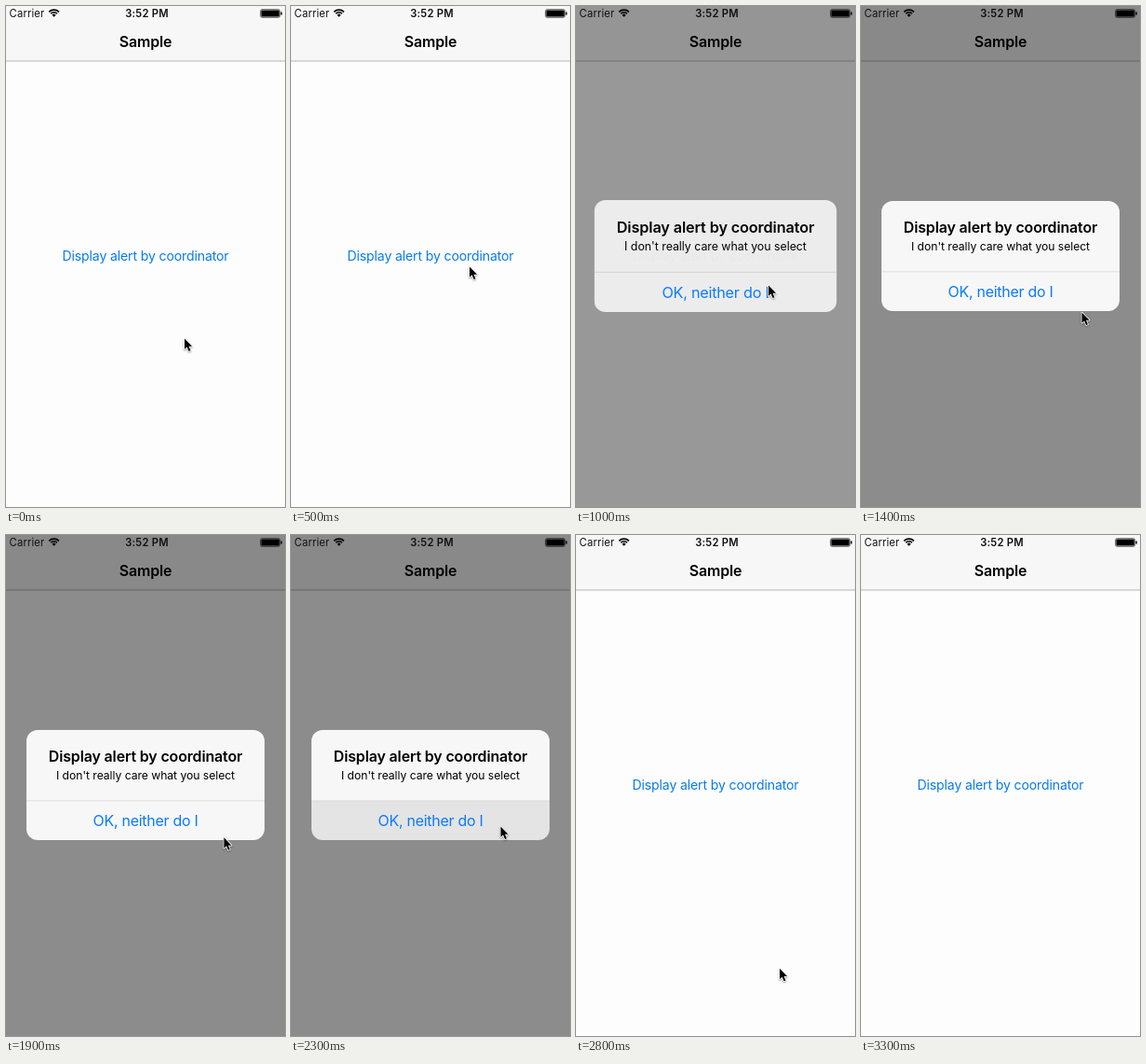
An HTML page with a canvas for the animation above (3400 ms loop, 300 px wide and 537 px high).

```html
<!DOCTYPE html>
<html lang="en">
<head>
<meta charset="utf-8">
<title>Alert sample</title>
<style>
html, body { margin: 0; width: 100%; height: 100%; overflow: hidden; background: #fdfdfd; }
canvas { display: block; width: 300px; height: 537px; }
</style>
</head>
<body>
<canvas id="stage"></canvas>
<script>
const W = 300, H = 537, LOOP = 3400, STEP = 100;
const TOUCH = 800, OPEN = 900, PRESS = 2100, CLOSE = 2300;
const canvas = document.getElementById('stage');
const ctx = canvas.getContext('2d');
const dpr = window.devicePixelRatio || 1;
canvas.width = W * dpr;
canvas.height = H * dpr;

const decay = ms => Math.exp(-ms / 44.5);

// How far the alert is shown, 0 to 1.
function presence(t) {
  if (t <= OPEN) return 0;
  return t <= CLOSE ? 1 - decay(t - OPEN) : decay(t - CLOSE);
}

function ease(t, start, end) {
  const u = Math.min(1, Math.max(0, (t - start) / (end - start)));
  return u * u * (3 - 2 * u);
}

function pointer(t) {
  const up = ease(t, 100, 600);
  const toAlert = ease(t, 900, 1000);
  const past = ease(t, 1000, 1300);
  const back = ease(t, 1800, PRESS);
  const leave = ease(t, 2500, 3000);
  return [
    192 + 15 * toAlert + 30.5 * past - 12 * back - 10 * leave,
    356.5 - 86 * up + 29 * toAlert + 29 * past - 16 * back + 235 * leave
  ];
}

function rect(x, y, w, h, color) {
  ctx.fillStyle = color;
  ctx.fillRect(x, y, w, h);
}

function pill(x, y, w, h, r) {
  ctx.beginPath();
  ctx.roundRect(x, y, w, h, r);
}

function text(str, x, y, size, color, weight = 400, track = 0, align = 'center') {
  ctx.font = `${weight} ${size}px Inter, Roboto, sans-serif`;
  ctx.letterSpacing = `${(track * size).toFixed(3)}px`;
  ctx.textAlign = align;
  ctx.fillStyle = color;
  ctx.fillText(str, x, y);
}

function wifi(x, y) {
  const from = -Math.PI * 0.75, to = -Math.PI * 0.25;
  ctx.strokeStyle = ctx.fillStyle = '#000';
  ctx.lineWidth = 1.6;
  for (const r of [7.6, 4.8]) {
    ctx.beginPath();
    ctx.arc(x, y, r, from, to);
    ctx.stroke();
  }
  ctx.beginPath();
  ctx.moveTo(x, y);
  ctx.arc(x, y, 2.9, from, to);
  ctx.fill();
}

function battery() {
  ctx.strokeStyle = ctx.fillStyle = '#000';
  ctx.lineWidth = 0.6;
  pill(273.6, 3.7, 21, 8.6, 1.8);
  ctx.stroke();
  pill(274.4, 4.5, 19.4, 7, 1);
  ctx.fill();
  pill(295.4, 6.3, 1.4, 3.4, 0.7);
  ctx.fill();
}

function statusBar() {
  text('Carrier', 3.6, 12, 11.25, '#111', 400, 0.012, 'left');
  wifi(51.6, 11.7);
  text('3:52 PM', 151.5, 12, 11.25, '#111', 600, 0.02);
  battery();
}

function buttonColor(t) {
  if (t < TOUCH || t > CLOSE) return '#087aef';
  return t <= OPEN ? '#bbdcfb' : '#c4c4c4';
}

function page(t) {
  rect(0, 0, W, H, '#fdfdfd');
  rect(0, 0, W, 58.5, '#f7f7f7');
  rect(0, 58.5, W, 1, '#b5b5b5');
  text('Sample', 150, 43.6, 15.94, '#000', 600, -0.008);
  text('Display alert by coordinator', 150, 273, 14.06, buttonColor(t), 400, -0.009);
}

function alertBox(t, shown) {
  const scale = t <= CLOSE ? 1 + 0.18 * (1 - shown) : 1;
  const pressed = t >= PRESS && t <= CLOSE;
  ctx.save();
  ctx.translate(150, 268);
  ctx.scale(scale, scale);
  ctx.translate(-150, -268);

  ctx.save();
  ctx.globalAlpha = shown;
  pill(22, 209, 256, 118, 12);
  ctx.clip();
  rect(22, 209, 256, 76, '#f7f7f7');
  rect(22, 285, 256, 42, pressed ? '#e4e4e4' : '#f7f7f7');
  rect(22, 284.5, 256, 0.8, '#d6d6d8');
  ctx.restore();

  ctx.globalAlpha = Math.min(1, 1.1 * shown);
  text('Display alert by coordinator', 150, 243, 15.94, '#000', 600, -0.008);
  text("I don't really care what you select", 150, 262, 12.19, '#000', 400, -0.004);
  text('OK, neither do I', 150, 312, 15.94, '#087aff', 400, -0.016);
  ctx.restore();
}

function arrow(t) {
  const [x, y] = pointer(t);
  if (y > H) return;
  const shape = [[0, 0], [0, 12.6], [2.9, 9.9], [5.1, 15], [7.2, 14.1], [5, 9.2], [9, 9.2]];
  ctx.save();
  ctx.translate(x, y);
  ctx.scale(0.9, 0.9);
  ctx.beginPath();
  shape.forEach(([px, py]) => ctx.lineTo(px, py));
  ctx.closePath();
  ctx.lineJoin = 'round';
  ctx.lineWidth = 1.7;
  ctx.strokeStyle = '#fff';
  ctx.shadowColor = 'rgba(0,0,0,0.4)';
  ctx.shadowBlur = 2 * dpr;
  ctx.shadowOffsetY = dpr;
  ctx.stroke();
  ctx.shadowColor = 'transparent';
  ctx.fillStyle = '#000';
  ctx.fill();
  ctx.restore();
}

function draw(t) {
  const shown = presence(t);
  ctx.setTransform(dpr, 0, 0, dpr, 0, 0);
  page(t);
  rect(0, 0, W, H, `rgba(0,0,0,${(0.447 * shown).toFixed(4)})`);
  statusBar();
  if (shown > 0.02) alertBox(t, shown);
  arrow(t);
}

const start = performance.now();
function tick() {
  const t = (performance.now() - start) % LOOP;
  draw(Math.floor(t / STEP) * STEP);
  requestAnimationFrame(tick);
}
tick();
</script>
</body>
</html>
```
